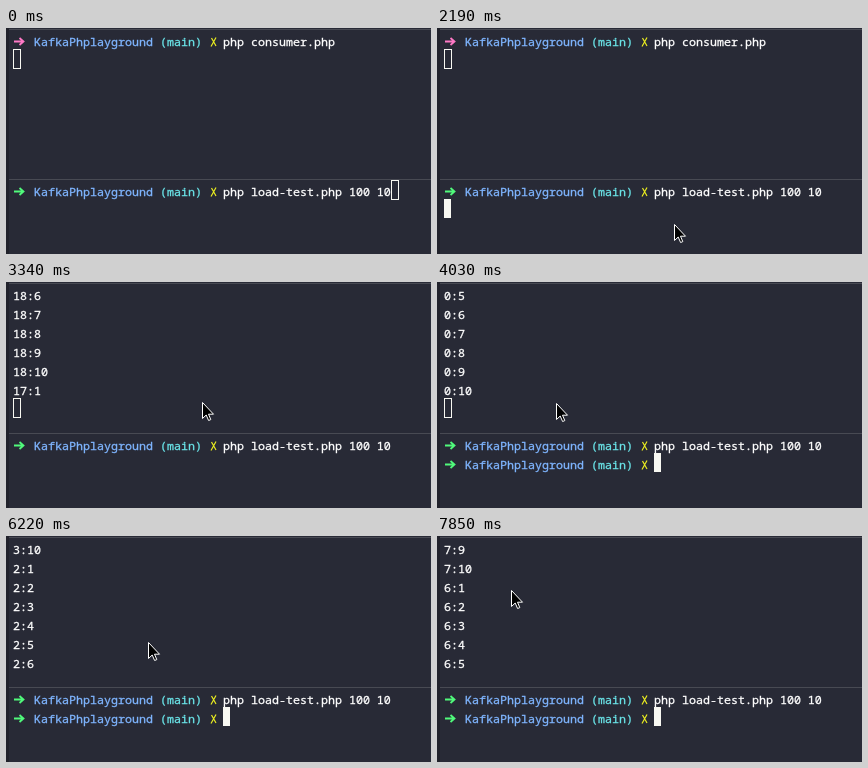
An HTML page that plays this animation: 425x226 px, repeating every 8000 ms.

```html
<!DOCTYPE html>
<html lang="en">
<head>
<meta charset="utf-8">
<title>Terminal</title>
<style>
html, body { margin: 0; width: 100%; height: 100%; overflow: hidden; background: #282a36; }
svg { display: block; width: 425px; height: 226px; color: #fff; }
text {
  font: 11.667px "Noto Sans Mono", "DejaVu Sans Mono", monospace; white-space: pre;
  fill: currentColor; stroke: currentColor; stroke-width: .3px;
}
</style>
</head>
<body>
<svg id="stage" viewBox="0 0 425 226">
  <rect width="425" height="226" fill="#282a36"/>
  <rect width="3" height="226" fill="#21222b"/>
  <rect x="3" y="1" width="422" height="1" fill="#484a53"/>
  <rect x="3" y="151" width="422" height="1" fill="#484a53"/>
</svg>
<script>
const LOOP = 8000, ROW = 19, COL = 7, LOWER = 150, ROWS = 7, TOTAL = 1000, PACE = 77.35;
const stage = document.getElementById('stage');

function add(parent, tag, attrs, text) {
  const el = document.createElementNS('http://www.w3.org/2000/svg', tag);
  for (const k in attrs) el.setAttribute(k, attrs[k]);
  if (text) el.textContent = text;
  parent.appendChild(el);
  return el;
}

function prompt(y, arrow, command) {
  const g = add(stage, 'g', { transform: `translate(0 ${y})` });
  const label = (x, color, s) => add(g, 'text', { x, y: 18, color }, s);
  add(g, 'path', { d: 'M8 13.5H17.5M13.5 10L17.5 13.5L13.5 17', fill: 'none', stroke: arrow, 'stroke-width': 1.8 });
  label(28, '#7fb5ff', 'KafkaPhplayground');
  label(154, '#6ae4e8', '(main)');
  add(g, 'path', { d: 'M210 9.5L205 18.5M205.5 10L210 18', fill: 'none', stroke: '#e9ec20', 'stroke-width': 1.2 });
  label(217, '#fff', command);
  return g;
}

const show = (el, on) => el.setAttribute('visibility', on ? 'visible' : 'hidden');
const clamp = v => Math.min(1, Math.max(0, v));
const smooth = p => p * p * (3 - 2 * p);
const snap = (t, origin) => origin + Math.floor((t - origin) / PACE) * PACE;

// Stops of the pointer: time, x, y
const stops = [[150, 335, 228], [600, 345, 190], [1080, 350, 228], [1250, 342, 222], [2190, 237, 196],
  [2860, 236, 160], [3340, 196, 120], [4030, 119, 121], [5530, 136, 109], [7000, 150, 103], [7850, 74, 54]];

function pointer(t) {
  const i = Math.max(1, stops.findLastIndex(s => s[0] <= t) + 1);
  const a = stops[i - 1], b = stops[i] || a;
  const p = smooth(clamp((t - a[0]) / (b[0] - a[0] || 1)));
  return [1, 2].map(k => Math.round(a[k] + (b[k] - a[k]) * p));
}

// Output comes fast, then slows down
const printed = t => Math.floor(TOTAL * (1 - (1 - clamp((snap(t, 3340) - 2250) / 1630)) ** 1.558));
const scrolled = t => Math.floor(Math.max(0, snap(Math.min(t, 7850), 7850) - 5110) * 0.0241);

const topPrompt = prompt(0, '#ff79c6', 'php consumer.php');
prompt(LOWER, '#50fa7b', 'php load-test.php 100 10');
const nextPrompt = prompt(LOWER + ROW, '#50fa7b');
const rows = Array.from({ length: ROWS }, (_, r) => add(stage, 'text', { x: 7, y: 18 + ROW * r }));

const hollow = (x, y) => add(stage, 'rect', { x, y, width: COL, height: ROW, fill: 'none', stroke: '#f8f8f2' });
const topCaret = hollow(7.5, 0);
const idleCaret = hollow(385.5, LOWER + 2.5);
const caret = add(stage, 'rect', { width: COL, height: ROW, fill: '#f8f8f2' });
const mouse = add(stage, 'path', {
  d: 'M.5 .5V16.5L4.2 13L6.6 18.5L8.8 17.6L6.5 12.2H11.5Z', fill: '#000', stroke: '#fff'
});

function line(i, count) {
  if (i < 1 || i > count) return '';
  const n = i - 1;
  return `${99 - Math.floor(n / 10)}:${n % 10 + 1}`;
}

function draw(t) {
  const count = printed(t), end = count + 1;
  const top = Math.max(0, end - ROWS + 1) - scrolled(t);
  rows.forEach((el, r) => { el.textContent = line(top + r, count); });
  show(topPrompt, top === 0);
  const caretRow = end - top;
  topCaret.setAttribute('y', 2.5 + ROW * caretRow);
  show(topCaret, caretRow < ROWS);

  const focused = t >= 460, entered = t >= 872, done = t >= 3800;
  show(nextPrompt, done);
  show(idleCaret, !focused);
  caret.setAttribute('x', !entered ? 385 : done ? 217 : 7);
  caret.setAttribute('y', LOWER + 2 + (entered ? ROW : 0));
  show(caret, focused && (!entered || Math.floor((t - 872) / 492) % 2 === 0));

  mouse.setAttribute('transform', `translate(${pointer(t)})`);
}

const start = performance.now();
function tick(now) {
  draw(Math.max(0, now - start) % LOOP);
  requestAnimationFrame(tick);
}
draw(0);
requestAnimationFrame(tick);
</script>
</body>
</html>
```
